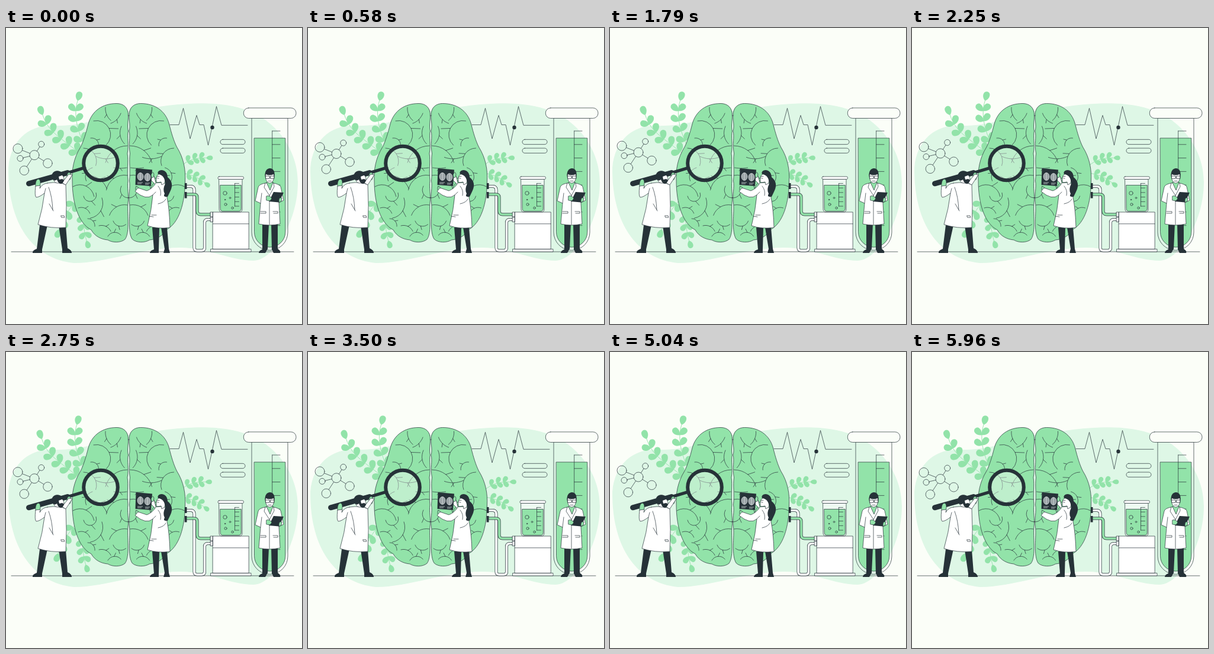
Write an HTML page that moves like this. It is 500 px wide and 500 px high and loops after 6000 ms.

```html
<!DOCTYPE html>
<html lang="en">
<head>
<meta charset="utf-8">
<title>Brain research</title>
<style>
html, body { margin: 0; width: 100%; height: 100%; overflow: hidden; background: #fbfef8; }
svg { display: block; width: 100vw; height: 100vh; }
.ln, .o { stroke: #263238; stroke-width: .7; stroke-linecap: round; stroke-linejoin: round; }
.ln, .pipe { fill: none; }
.w { fill: #fff; }
.g { fill: #92e3a9; }
.d { fill: #263238; }
.bar { stroke: #263238; stroke-linecap: round; }
.stem { fill: none; stroke: #92e3a9; stroke-width: .9; }
</style>
</head>
<body>
<svg viewBox="0 0 500 500">
  <path fill="#def7e6" d="M4 236C8 190 38 165 75 165C130 167 165 150 215 140C290 126 360 120 410 140C455 157 493 205 493 260C493 330 450 393 418 393C380 393 340 371 295 371C230 371 170 397 115 397C45 390 3 330 4 236Z"/>
  <path class="ln" d="M9 378H486"/>
  <g id="plants" class="g"></g>
  <g id="molecule" class="ln"></g>

  <!-- monitor trace -->
  <path class="ln" d="M277 163.5H292L299.5 135.5L311 187L322 147.5L327 163.5H334L341.5 198L355.5 132.5L364 164.3H408"/>
  <circle class="d" cx="348.5" cy="168" r="3.2"/>
  <rect class="ln" x="362" y="188.3" width="42" height="8.3" rx="4.15"/>
  <rect class="ln" x="362" y="203" width="42" height="8.3" rx="4.15"/>

  <!-- test tube -->
  <path class="ln" d="M415 152.5V345A30.5 30.5 0 0 0 476 345V152.5Z"/>
  <path class="g o" d="M419.5 186H471.8V345A26 25 0 0 1 419.5 345Z"/>
  <rect class="o" fill="#fbfef8" x="401.3" y="135" width="88.7" height="17.5" rx="8.5"/>

  <!-- machine and beaker -->
  <g id="pipes" class="pipe"></g>
  <path class="w o" d="M349.5 311H410.2V373.5H349.5ZM349.5 330.8H410.2M346 373.5H414V378H346ZM345.5 311H349.5V319H345.5ZM345.5 319.5H349.5V327.5H345.5Z"/>
  <path class="o" fill="#fff" fill-opacity=".5" d="M360 255.5H399V306Q399 311 394 311H365Q360 311 360 306Z"/>
  <path class="g o" d="M362 265.5H397.3V305Q397.3 309.5 393 309.5H366Q362 309.5 362 305Z"/>
  <rect class="w o" x="358" y="251" width="43.5" height="4.5" rx="2"/>
  <g id="marks" class="ln">
    <circle cx="370" cy="279" r="3.2"/><circle cx="378.5" cy="287" r="1.3"/>
    <circle cx="371" cy="298" r="2.1"/><circle cx="382.5" cy="304" r="1.8"/>
    <circle cx="370" cy="290" r=".8"/>
  </g>

  <!-- brain -->
  <path fill="#def7e6" d="M202 140H212V350H202Z"/>
  <g id="half">
    <path class="g o" d="M206.5 148C207 134 198 127.5 187 127.5C163 127.5 145 140 139 162C135 178 131 191 126 201C114 220 111 240 112 258C112 295 122 330 144 341C150 352 161 357 172 358C180 363 194 363 201 357C210 345 204 310 206 296C208 282 204 270 206 258C204 240 207 226 205 212C208 196 204 184 206.5 174C204 165 207 156 206.5 148Z"/>
    <path id="folds" class="ln"/>
  </g>
  <use href="#half" transform="matrix(-1 0 0 1 414.5 0)"/>
  <path class="d" d="M301.8 262H305.5V272H301.8ZM301.8 277H305.5V287.5H301.8Z"/>

  <!-- magnifier -->
  <path class="bar" stroke-width="5" d="M133 236L103 245"/>
  <path class="bar" stroke-width="9" d="M104 244.5L38.500 262.8"/>
  <circle class="bar" cx="160" cy="228.5" r="28.8" fill="#fff" fill-opacity=".4" stroke-width="6"/>

  <!-- man with magnifier -->
  <path class="d" d="M57 333H70L61 374V380H45Q44 376 52 373ZM89 334H101L104 372Q111 375 111 380H95V374Z"/>
  <path class="g o" d="M50 268C48 251 62 251 57 268ZM103 252C102 240 114 242 108 256Z"/>
  <path class="w o" d="M101 265L112 248L106 247L95 261Z"/>
  <path class="w o" d="M70 262Q61 263 57 271L58 266L50 267Q48 284 51 286Q56 286 65 279Q62 305 54 332Q75 339 101 337Q103 300 101 265Q90 259 70 262Z"/>
  <path class="ln" d="M65 279L67 271M72 269Q78 285 79 307M73 297L80 309M93 317H98L99 320H94Z"/>
  <path class="w o" d="M80 251C83 243 96 243 98 255Q96 263 87 262Q80 262 80 251Z"/>
  <path class="d" d="M79 256C74 246 82 240 89 241.5Q96 243 97 248L89 251L90 256L95 255L98 257Q96 264 92 263Q88 262 86 256Q82 259 79 256Z"/>

  <!-- woman with scan -->
  <path class="d" d="M247 337H259L258 374V380H243Q243 376 250 374ZM262 337H272L275 373L277 380H266L268 373Z"/>
  <path class="w o" d="M250 250L245 247V257L254 266Z"/>
  <path class="d" d="M219.5 237L247 239.5L245 267L218.5 265Z"/>
  <g fill="#9aa3a6" stroke="#e3e8e8" stroke-width=".7">
    <ellipse cx="227" cy="251" rx="5" ry="6.5"/><ellipse cx="239" cy="252" rx="5" ry="6.5"/>
    <path d="M227 245V257M239 246V258M222 261H231M222 263H229M235 262H243M235 264H241"/>
  </g>
  <path class="g o" d="M245 248Q248 240 250 247L249 252L246 253ZM219 273Q218 263 225 271L222 276Z"/>
  <path class="w o" d="M253 262Q248 271 238 275L223 270L218 276Q237 292 248 282Q246 307 239 334Q257 340 277 337Q276 306 272 286Q273 266 267 261Z"/>
  <path class="ln" d="M248 282L253 277M257 267Q263 274 261 283M246 316H254M257 297Q267 295 270 289M242 318L249 319"/>
  <path class="w o" d="M255 250Q252 261 256 261L262 260L263 265L268 262L270 249L261 244Z"/>
  <path class="d" d="M257 247C253 239 272 235 273 252Q283 260 279 272Q277 277 273 285Q264 286 268 280Q264 273 269 263Q268 248 257 247Z"/>
  <path class="ln" d="M255 251L259 250.500M256 254H258"/>

  <!-- man with clipboard -->
  <path class="d" d="M433 331H444L442 373L438 380H427Q427 376 433 374ZM448 331H459V373Q465 377 463 380H452L449 374Z"/>
  <path class="w o" d="M438 262Q427 264 426 269L421 292L430 296L427 331Q445 335 463 331L461 295L469 291L464 268Q462 264 452 262Z"/>
  <path class="g o" d="M440 261L446 274L451 261Z"/>
  <path class="ln" d="M438 262L436 269L445 283L453 268L452 262M445 283V332M430 296L432 279M430 310H439V313H430M451 310H459V313H452M461 295L459 281"/>
  <path class="d" d="M452 277L469 278L461 294.5L444 293Z"/>
  <path class="g o" d="M440 284Q445 282 449 288L446 292L440 291ZM461 291Q461 286 466 287L465 293L461 294Z"/>
  <path class="w o" d="M438 247C437 267 454 267 453 247L446 244Z"/>
  <path class="d" d="M438 252C434 232 458 232 453 252L452 247Q445 250 439 247Z"/>
  <path class="ln" d="M439 250H445V254.5H439ZM447 250H453V254.5H447ZM445 252H447M443 258.5H448"/>
</svg>
<script>
const LOOP = 6000, RAD = Math.PI / 180;
const $ = id => document.getElementById(id);
const plants = $("plants"), molecule = $("molecule");

function add(parent, tag, attrs) {
  const el = document.createElementNS("http://www.w3.org/2000/svg", tag);
  for (const key in attrs) el.setAttribute(key, attrs[key]);
  return parent.appendChild(el);
}

// A leaf at the tip of the stem, then evenly spaced pairs back towards its root.
function sprig(d, size, gap, pairs) {
  const stem = add(plants, "path", { d, class: "stem" });
  const end = stem.getTotalLength();
  const leaf = (p, turn) => add(plants, "path", {
    d: "M0 0C.2 -.3 .5 -.42 .78 -.33C1.06 -.2 1.06 .2 .78 .3C.5 .38 .2 .25 0 0Z",
    transform: `translate(${p.x} ${p.y}) rotate(${turn}) scale(${size})`
  });
  for (let i = 0; i <= pairs; i++) {
    const p = stem.getPointAtLength(end - i * gap);
    const q = stem.getPointAtLength(end - i * gap - 4);
    const heading = Math.atan2(p.y - q.y, p.x - q.x) / RAD;
    for (const side of i ? [-46, 46] : [0]) leaf(p, heading + side);
  }
}
sprig("M137 207C121 177 113 147 121 123", 16, 17.5, 4);
sprig("M127 214C95 186 72 178 62 147", 16, 17.5, 5);
sprig("M126 283C112 300 100 312 90 340", 15, 17, 3);
sprig("M129 314C131 330 132 346 136 359", 13.5, 14, 3);
sprig("M294 235C307 222 322 219 338 219.5", 11.5, 11, 3);
sprig("M294 245C310 246 324 252 335 261", 11.5, 11, 3);

const atoms = [[48, 214.7, 8], [20, 203.7, 8], [59.7, 196.3, 5],
  [24, 220.3, 5], [70.5, 228.5, 7.7], [30.8, 240.7, 7.7]];
const [cx, cy, cr] = atoms[0];
atoms.forEach(([x, y, r], i) => {
  add(molecule, "circle", { cx: x, cy: y, r });
  if (!i) return;
  const dist = Math.hypot(x - cx, y - cy), ux = (x - cx) / dist, uy = (y - cy) / dist;
  add(molecule, "line", { x1: cx + ux * cr, y1: cy + uy * cr, x2: x - ux * r, y2: y - uy * r });
});

function pipe(d, color) {
  add($("pipes"), "path", { d, stroke: "#263238", "stroke-width": 5 });
  add($("pipes"), "path", { d, stroke: color, "stroke-width": 3.6 });
}
pipe("M305 267.5H312Q318 267.5 318 273.5V371Q318 376 323 376H330.5Q335.5 376 335.5 371V329Q335.5 323.5 341 323.5H346", "#fff");
pipe("M305 281H318Q323 281 323 286V309Q323 315 329 315H346", "#92e3a9");

function scale(x, y, width, gap, count) {
  let d = `M${x} ${y}v${gap * (count - 1)}`;
  for (let i = 0; i < count; i++) d += `M${x} ${y + i * gap}h${width}`;
  add($("marks"), "path", { d });
}
scale(449.7, 174, 13.3, 22.8, 8);
scale(386.5, 262.5, 7, 7.7, 6);

// A fold bends steadily along its length and sends out one short twig.
function fold([x, y, heading, length, bend]) {
  const steps = 8;
  let d = `M${x} ${y}`, twig = "";
  for (let i = 0; i < steps; i++) {
    const a = (heading + bend * (i + .5) / steps) * RAD;
    x += Math.cos(a) * length / steps;
    y += Math.sin(a) * length / steps;
    d += `L${x.toFixed(1)} ${y.toFixed(1)}`;
    if (i === 3) {
      const b = a - Math.sign(bend) * .9, r = length * .25;
      twig = `M${x} ${y}l${Math.cos(b) * r} ${Math.sin(b) * r}`;
    }
  }
  return d + twig;
}
$("folds").setAttribute("d", [
  [168, 134, 95, 25, -55], [194, 144, 110, 25, 50], [148, 157, -12, 62, 150],
  [195, 166, 115, 32, -70], [143, 186, -10, 22, 110], [205, 199, 180, 50, -75],
  [131, 203, 0, 42, 110], [152, 217, 25, 33, -45], [182, 236, 10, 22, -20],
  [146, 236, 165, 28, -100], [138, 249, 0, 42, 70], [205, 249, 190, 48, -90],
  [113, 268, -30, 46, 110], [131, 284, 80, 36, -190], [195, 267, 120, 30, -130],
  [122, 304, -20, 24, 90], [162, 287, 70, 45, 100], [205, 299, 190, 38, -80],
  [138, 322, 0, 20, 95], [157, 334, -15, 24, 80], [181, 326, 70, 26, -110],
  [172, 352, -60, 26, 110]
].map(fold).join(""));

const smooth = v => (v = Math.max(0, Math.min(1, v))) * v * (3 - 2 * v);

function draw(now) {
  const t = now % LOOP;
  // The sway swells after the start and dies away before the loop closes.
  const swell = smooth((t - 250) / 1400) * smooth((5800 - t) / 1400);
  const sway = 2.6 * swell * Math.cos(2 * Math.PI * (t - 3540) / 1200);
  const lift = -5.7 * (1 - Math.abs(1 - t % 3000 / 1500));
  plants.setAttribute("transform", `translate(${sway.toFixed(3)} 0)`);
  molecule.setAttribute("transform", `translate(0 ${lift.toFixed(3)})`);
}

function tick() {
  draw(performance.now());
  requestAnimationFrame(tick);
}
tick();
</script>
</body>
</html>
```
